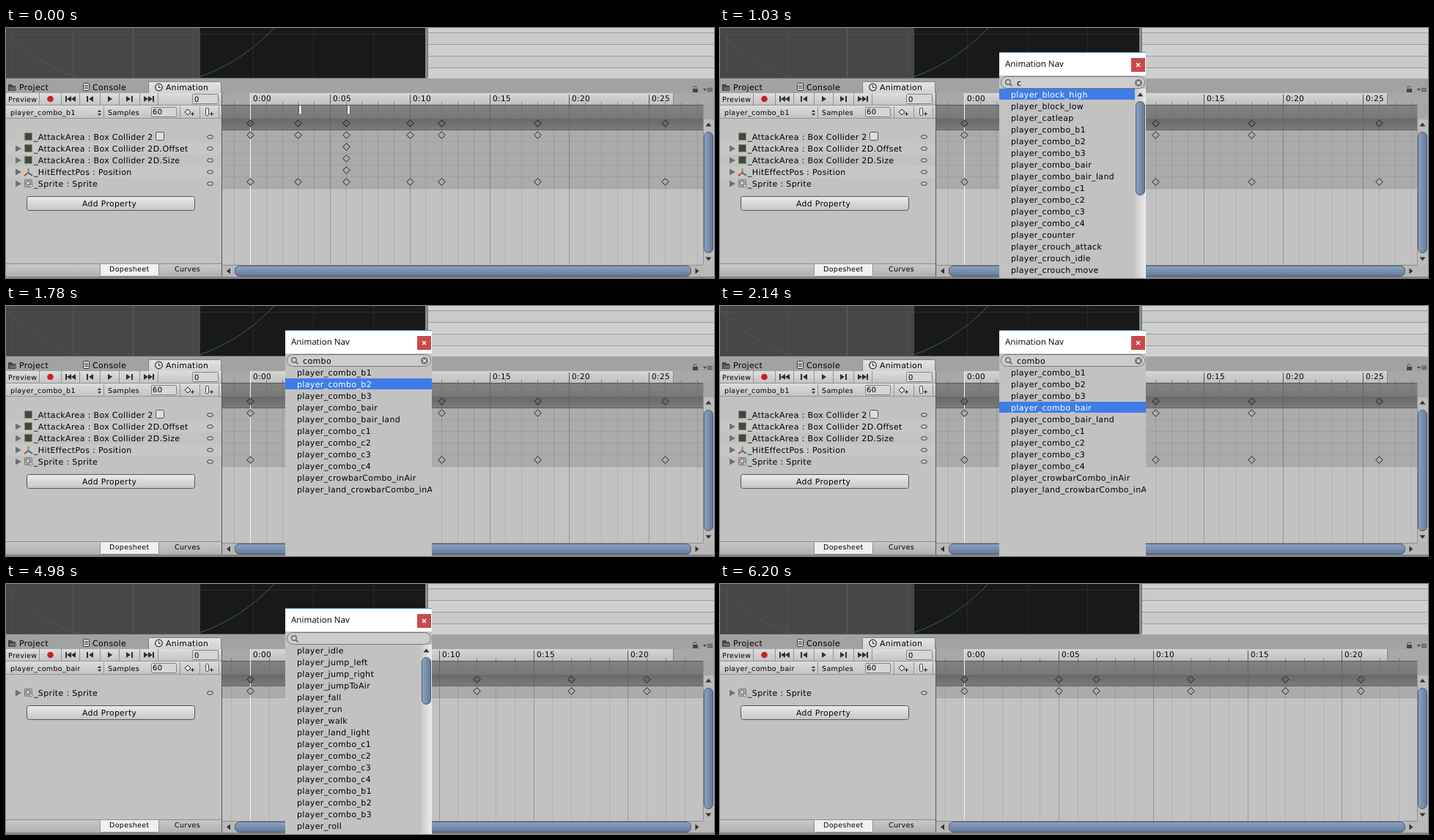
An HTML page with a canvas that plays this animation: 966 px wide and 342 px high, repeating every 8000 ms.

```html
<!DOCTYPE html>
<html lang="en">
<head>
<meta charset="utf-8">
<title>Animation window</title>
<style>
html, body { margin: 0; width: 100%; height: 100%; overflow: hidden; background: #a2a2a2; }
canvas { display: block; }
</style>
</head>
<body>
<canvas id="stage" width="966" height="342"></canvas>
<script>
const ctx = document.getElementById('stage').getContext('2d');
const LOOP = 8000;
const names = (s) => s.split(' ').map((n) => 'player_' + n);

const recent = names('idle jump_left jump_right jumpToAir fall run walk land_light combo_c1 combo_c2 combo_c3 combo_c4 combo_b1 combo_b2 combo_b3 roll');
const combos = names('combo_b1 combo_b2 combo_b3 combo_bair combo_bair_land combo_c1 combo_c2 combo_c3 combo_c4');
const crowbar = names('crowbarCombo_inAir land_crowbarCombo_inAir');
const sorted = [...names('block_high block_low catleap'), ...combos, ...names('counter crouch_attack crouch_idle crouch_move')];
const comboHits = [...combos, ...crowbar];
const coHits = [...combos, 'player_counter', ...crowbar];
const airHits = names('combo_bair combo_bair_land crowbarCombo_inAir jumpToAir land_crowbarCombo_inAir');

const allKeys = [0, 3, 6, 10, 12, 18, 26];
const clipB1 = {
  name: 'player_combo_b1', step: 21.77, keys: allKeys, events: [3, 6],
  rows: [
    { label: '_AttackArea : Box Collider 2', icon: 'box', check: true, keys: allKeys.slice(0, 6) },
    { label: '_AttackArea : Box Collider 2D.Offset', icon: 'box', fold: true, keys: [6] },
    { label: '_AttackArea : Box Collider 2D.Size', icon: 'box', fold: true, keys: [6] },
    { label: '_HitEffectPos : Position', icon: 'axes', fold: true, keys: [6] },
    { label: '_Sprite : Sprite', icon: 'sprite', fold: true, keys: allKeys }
  ]
};
const airKeys = [0, 5, 7, 12, 17, 21];
const clipBair = {
  name: 'player_combo_bair', step: 25.77, keys: airKeys, events: [],
  rows: [{ label: '_Sprite : Sprite', icon: 'sprite', fold: true, keys: airKeys }]
};

// thumb: height of the popup scrollbar handle, 0 when the list fits
const nav = (query, list, selected, thumb = 0) => ({ query, list, selected, thumb });
const steps = [
  { at: 0, clip: clipB1 },
  { at: 500, clip: clipB1, popup: nav('', recent, -1, 65) },
  { at: 1030, clip: clipB1, popup: nav('c', sorted, 0, 129) },
  { at: 1110, clip: clipB1, popup: nav('co', coHits, 0) },
  { at: 1190, clip: clipB1, popup: nav('com', comboHits, 0) },
  { at: 1260, clip: clipB1, popup: nav('combo', comboHits, 0) },
  { at: 1780, clip: clipB1, popup: nav('combo', comboHits, 1) },
  { at: 1960, clip: clipB1, popup: nav('combo', comboHits, 2) },
  { at: 2140, clip: clipB1, popup: nav('combo', comboHits, 3) },
  { at: 2390, clip: clipBair },
  { at: 4980, clip: clipBair, popup: nav('', recent, -1, 65) },
  { at: 5350, clip: clipBair, popup: nav('a', sorted, 0, 65) },
  { at: 5500, clip: clipBair, popup: nav('ai', airHits, 0) },
  { at: 5580, clip: clipBair, popup: nav('air', airHits, 0) },
  { at: 6200, clip: clipBair }
];

function rect(x, y, w, h, fill) {
  ctx.fillStyle = fill;
  ctx.fillRect(x, y, w, h);
}
function shade(x, y, w, h, from, to, across) {
  const g = across ? ctx.createLinearGradient(x, 0, x + w, 0) : ctx.createLinearGradient(0, y, 0, y + h);
  g.addColorStop(0, from);
  g.addColorStop(1, to);
  return g;
}
function grad(x, y, w, h, from, to, across) {
  rect(x, y, w, h, shade(x, y, w, h, from, to, across));
}
function paint(fill, stroke, width = 1) {
  if (fill) { ctx.fillStyle = fill; ctx.fill(); }
  if (stroke) { ctx.strokeStyle = stroke; ctx.lineWidth = width; ctx.stroke(); }
}
function round(x, y, w, h, r, fill, stroke) {
  ctx.beginPath();
  ctx.roundRect(x + .5, y + .5, w - 1, h - 1, r);
  paint(fill, stroke);
}
function poly(points, fill, stroke) {
  ctx.beginPath();
  points.forEach(([x, y]) => ctx.lineTo(x, y));
  ctx.closePath();
  paint(fill, stroke);
}
function line(x1, y1, x2, y2, color, width = 1) {
  ctx.beginPath();
  ctx.moveTo(x1, y1);
  ctx.lineTo(x2, y2);
  paint(null, color, width);
}
function circle(x, y, r, fill, stroke, width) {
  ctx.beginPath();
  ctx.arc(x, y, r, 0, Math.PI * 2);
  paint(fill, stroke, width);
}
function text(s, x, y, size = 11, color = '#000') {
  ctx.font = size + 'px "DejaVu Sans", sans-serif';
  ctx.letterSpacing = '0.35px';
  ctx.fillStyle = color;
  ctx.fillText(s, x, y);
}
const arrowUp = (x, y, dir = 1) => poly([[x - 4, y + 2.5 * dir], [x + 4, y + 2.5 * dir], [x, y - 2.5 * dir]], '#333');
const arrowSide = (x, y, dir) => poly([[x - 2.5 * dir, y - 4], [x - 2.5 * dir, y + 4], [x + 2.5 * dir, y]], '#333');

function clipped(x, y, w, h, draw) {
  ctx.save();
  ctx.beginPath();
  ctx.rect(x, y, w, h);
  ctx.clip();
  draw();
  ctx.restore();
}

function scene() {
  clipped(0, 0, 572, 68, () => {
    rect(0, 0, 265, 68, '#474747');
    rect(265, 0, 307, 68, '#191919');
    for (let x = 9; x < 572; x += 82) rect(x, 0, 1, 68, x === 173 ? '#626262' : x < 265 ? '#505050' : '#292929');
    rect(0, 8, 265, 1, '#505050');
    rect(265, 8, 307, 1, '#292929');
    circle(180, -171.7, 253, null, '#2d6663');
  });
  rect(0, 68, 573, 1, '#5c5c5c');
  rect(572, 0, 3, 69, '#8a8a8a');
  rect(575, 0, 391, 69, '#cacaca');
  for (let i = 0; i < 5; i++) {
    const y = 16 * i - 9;
    rect(576, y, 390, 15, i % 2 ? '#cacaca' : '#d0d0d0');
    rect(576, y + 15, 390, 1, '#9b9b9b');
  }
  rect(575, 0, 1, 68, '#777');
}

function tabs() {
  rect(0, 69, 966, 19, '#a2a2a2');
  round(194, 73, 100, 18, 2, shade(194, 73, 100, 16, '#e4e4e4', '#d2d2d2'), '#808080');
  poly([[3, 77], [8, 77], [9, 79], [13, 79], [13, 86], [3, 86]], '#444');
  rect(5, 81, 9, 4, '#6b6b6b');
  round(105, 75, 9, 11, 1, '#ddd', '#333');
  for (let y = 78; y < 84; y += 2) rect(107, y, 5, 1, '#444');
  circle(208.5, 81, 4.8, '#e8e8e8', '#333', 1.3);
  line(208.5, 78, 208.5, 81.5, '#222');
  line(208.5, 81.5, 211, 81.5, '#222');
  text('Project', 18, 85);
  text('Console', 118, 85);
  text('Animation', 218, 85, 10.8);
  rect(937, 83, 7, 5, '#444');
  ctx.beginPath();
  ctx.arc(940, 82, 2.3, Math.PI, 0);
  paint(null, '#555');
  poly([[951, 83], [956, 83], [953.5, 86]], '#444');
  for (let y = 82; y < 88; y += 2) rect(957, y, 7, 1, '#444');
}

function transport() {
  grad(0, 89, 294, 16, '#dedede', '#c4c4c4');
  rect(0, 105, 294, 1, '#929292');
  [45, 75, 100, 128, 154, 182, 207].forEach((x) => rect(x, 89, 1, 16, '#929292'));
  text('Preview', 3, 101, 9.5);
  circle(60.5, 97, 4.3, '#c52420');
  const dark = '#303030';
  const play = (x, dir) => poly([[x, 93], [x, 101], [x + 6 * dir, 97]], dark);
  rect(81, 93, 2, 8, dark); play(89, -1); play(95, -1);
  rect(110, 93, 2, 8, dark); play(119, -1);
  play(139, 1);
  play(164, 1); rect(171, 93, 2, 8, dark);
  play(188, 1); play(194, 1); rect(200, 93, 2, 8, dark);
  round(254, 90, 36, 14, 1, '#d6d6d6', '#828282');
  text('0', 257, 101, 10);
}

function clipBar(name) {
  grad(0, 106, 294, 17, '#dcdcdc', '#c4c4c4');
  rect(0, 123, 294, 1, '#929292');
  [133, 237, 264, 290].forEach((x) => rect(x, 107, 1, 16, '#929292'));
  text(name, 6, 119, 9.5);
  poly([[125, 115], [130, 115], [127.5, 112]], '#333');
  poly([[125, 117], [130, 117], [127.5, 120]], '#333');
  text('Samples', 139, 119, 9.5);
  round(198, 108, 35, 14, 1, '#d6d6d6', '#828282');
  text('60', 200, 118, 10);
  diamond(248, 115, '#e4e4e4', 4);
  round(272, 109, 5, 11, 1, '#eee', '#444');
  [254, 280].forEach((x) => {
    rect(x - 2, 117, 5, 1, '#222');
    rect(x, 115, 1, 5, '#222');
  });
}

function diamond(x, y, fill, r = 4.8) {
  poly([[x, y - r], [x + r, y], [x, y + r], [x - r, y]], fill, '#1c1c1c');
}

function rowIcon(kind, y) {
  if (kind === 'box') {
    rect(25, y - 6, 11, 11, '#7f9a63');
    rect(26, y - 5, 9, 9, '#444');
  } else if (kind === 'axes') {
    line(30.5, y + 1, 30.5, y - 5, '#6aa31c', 2);
    line(30.5, y + 1, 25, y + 5, '#cf3a22', 2);
    line(30.5, y + 1, 36, y + 5, '#2f62c4', 2);
  } else {
    round(25, y - 6, 11, 11, 1, '#a9a9a9', '#777');
    circle(30, y - 1, 2.5, '#ddd', '#666');
    circle(34, y + 3, 2, '#e4e4e4', '#777');
  }
}

function properties(rows) {
  rect(0, 124, 294, 200, '#c2c2c2');
  rows.forEach((row, i) => {
    const y = 149 + 16 * i;
    if (i % 2) rect(0, y - 8, 294, 16, '#c7c7c7');
    if (row.fold) poly([[13, y - 4.5], [13, y + 4.5], [21, y]], '#707070');
    rowIcon(row.icon, y);
    text(row.label, 38, y + 4);
    if (row.check) round(204, y - 7, 12, 12, 2, '#dedede', '#555');
    ctx.beginPath();
    ctx.ellipse(278.5, y, 4, 2.3, 0, 0, Math.PI * 2);
    paint('#d0d0d0', '#333');
  });
  const top = 150 + 16 * rows.length;
  round(28, top, 230, 20, 3, shade(28, top, 230, 20, '#ececec', '#c4c4c4'), '#555');
  text('Add Property', 104, top + 14, 10.8);
}

function dopesheet({ step, keys, events, rows }) {
  const at = (frame) => 333 + Math.round(frame * step);
  rect(295, 89, 671, 16, '#a8a8a8');
  grad(333, 89, 577, 16, '#d6d6d6', '#c0c0c0');
  rect(910, 89, 1, 16, '#888');
  rect(295, 105, 656, 1, '#555');
  grad(295, 106, 656, 18, '#828282', '#787878');
  grad(295, 124, 656, 15, '#686868', '#7b7b7b');
  rect(295, 139, 656, 1, '#5f5f5f');
  rect(295, 140, 656, 184, '#c2c2c2');
  rows.forEach((_, i) => {
    rect(295, 140 + 16 * i, 656, 16, '#ababab');
    rect(295, 155 + 16 * i, 656, 1, '#a0a0a0');
  });
  for (let f = -1; at(f) < 951; f++) {
    const major = f % 5 === 0;
    rect(at(f), major ? 91 : 101, 1, major ? 14 : 4, major ? '#555' : '#808080');
    rect(at(f), 106, 1, 33, major ? '#666' : '#737373');
    rect(at(f), 140, 1, 184, major ? 'rgba(0,0,0,.22)' : 'rgba(0,0,0,.09)');
    if (major && at(f) < 910) text('0:' + String(f).padStart(2, '0'), at(f) + 4, 100, 10.5);
  }
  rect(333, 89, 1, 235, '#f4f4f4');
  events.forEach((f) => round(at(f) + 1, 105, 5, 14, 2, '#eee', '#555'));
  keys.forEach((f) => diamond(at(f) + .5, 130.5, '#6a6a6a'));
  rows.forEach((row, i) => row.keys.forEach((f) => diamond(at(f) + .5, 146.5 + 16 * i, '#ababab')));
}

function blueThumb(x, y, w, h, upright) {
  round(x, y, w, h, 6, shade(x, y, w, h, '#90a5c1', '#5f7898', upright), '#4a5970');
}

function frameBars() {
  rect(294, 89, 1, 252, '#555');
  rect(951, 106, 15, 218, '#bcbcbc');
  rect(951, 106, 1, 218, '#929292');
  rect(952, 106, 14, 19, '#a6a6a6');
  arrowUp(958.5, 132);
  blueThumb(952, 142, 13, 166, true);
  arrowUp(958.5, 316, -1);
  grad(0, 323, 294, 17, '#c9c9c9', '#b0b0b0');
  rect(0, 322, 294, 1, '#8a8a8a');
  round(128, 322, 81, 18, 1, '#f0f0f0', '#8d8d8d');
  text('Dopesheet', 141, 333, 9.5);
  text('Curves', 230, 333, 9.5);
  rect(295, 324, 671, 16, '#b8b8b8');
  rect(295, 324, 656, 1, '#8e8e8e');
  blueThumb(312, 325, 623, 15, false);
  arrowSide(303.5, 332.5, -1);
  arrowSide(943, 332.5, 1);
  rect(0, 340, 966, 2, '#858585');
}

function navPopup({ query, list, selected, thumb }) {
  rect(381, 33, 200, 309, '#c2c2c2');
  rect(381, 34, 200, 31, '#fff');
  rect(381, 33, 200, 1, '#4aa3e0');
  ctx.font = '11.6px "Open Sans", sans-serif';
  ctx.letterSpacing = '0px';
  ctx.fillStyle = '#000';
  ctx.fillText('Animation Nav', 389, 53);
  rect(561, 41, 19, 19, '#c64b4b');
  line(568, 48, 573, 53, '#fff', 1.4);
  line(573, 48, 568, 53, '#fff', 1.4);
  round(383, 66, 197, 17, 8, '#cdcdcd', '#777');
  circle(393, 74, 3.3, null, '#555', 1.2);
  line(395.5, 76.5, 398.5, 79.5, '#555', 1.5);
  text(query, 405, 79);
  if (query) {
    circle(571, 75, 5, '#777');
    line(569, 73, 573, 77, '#eee', 1.3);
    line(573, 73, 569, 77, '#eee', 1.3);
  }
  const width = thumb ? 185 : 200;
  clipped(381, 83, width, 259, () => list.forEach((name, i) => {
    const on = i === selected;
    if (on) rect(381, 83 + 16 * i, width, 15, '#3e7de7');
    text(name, 397, 95 + 16 * i, 11, on ? '#fff' : '#000');
  }));
  if (thumb) {
    grad(566, 83, 15, 259, '#c8c8c8', '#ececec', true);
    arrowUp(573.5, 91);
    blueThumb(567, 100, 13, thumb, true);
  }
}

function draw({ clip, popup }) {
  ctx.textRendering = 'geometricPrecision';
  rect(0, 0, 966, 342, '#a2a2a2');
  scene();
  tabs();
  transport();
  clipBar(clip.name);
  properties(clip.rows);
  dopesheet(clip);
  frameBars();
  if (popup) navPopup(popup);
}

let shown;
function tick() {
  const time = performance.now() % LOOP;
  const step = steps.findLast((s) => s.at <= time);
  if (step !== shown) draw(shown = step);
  requestAnimationFrame(tick);
}
tick();
</script>
</body>
</html>
```
